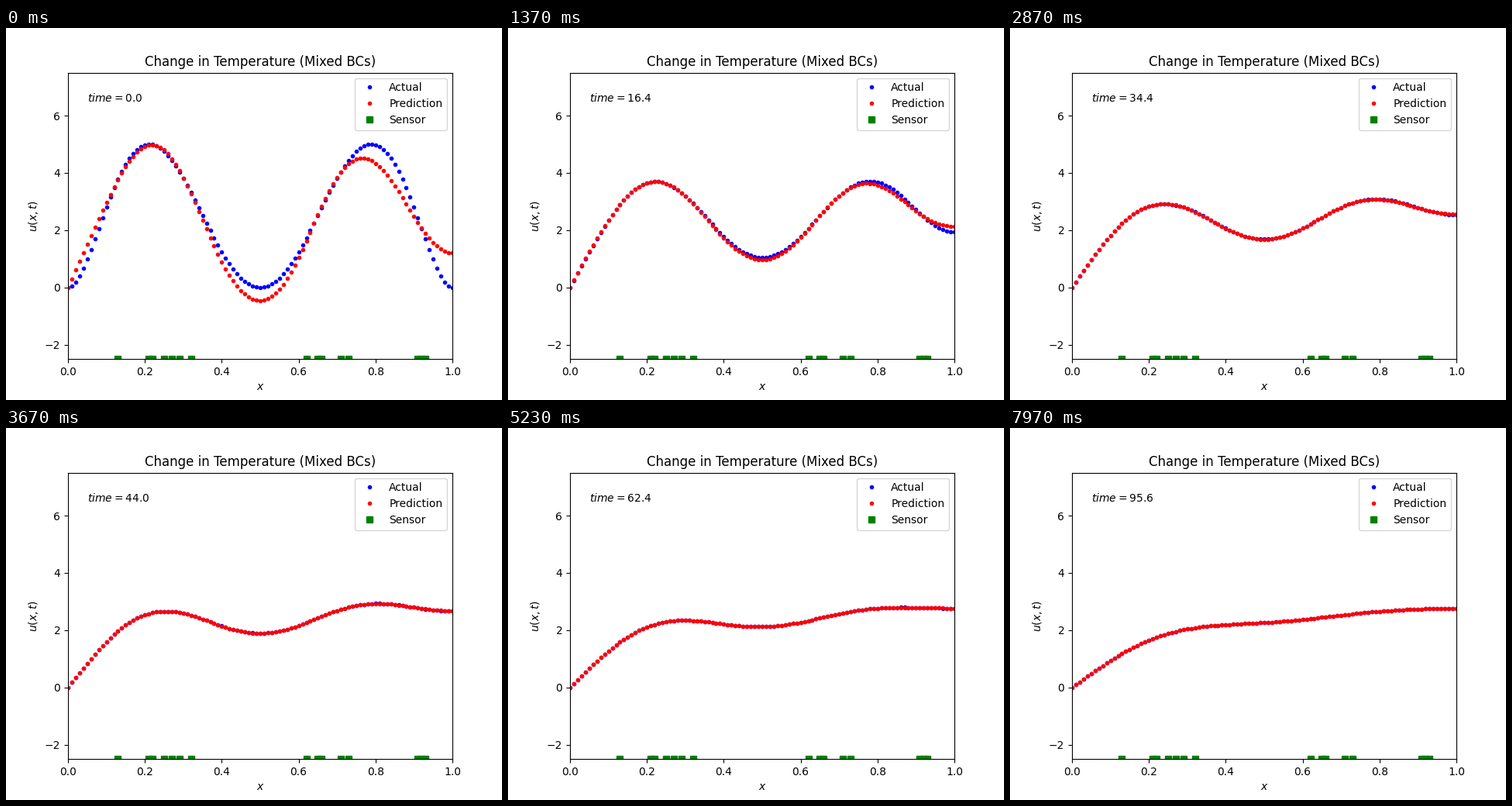
A matplotlib script for the animation above (8 s loop, 640 by 480 pixels).

```python
import numpy as np
import matplotlib.pyplot as plt
from matplotlib.animation import FuncAnimation

FRAMES, LOOP_MS = 240, 8000
DT = 0.4            # simulated time per frame
ALPHA = 3e-4        # diffusivity

x = np.linspace(0, 1, 101)
sensors = [.13, .21, .22, .25, .27, .29, .32, .62,
           .65, .66, .71, .73, .91, .92, .93]


def start(x):
    """Initial temperature: two humps of height 5."""
    return 2160 * (x * (1 - x) * (x - 0.5)) ** 2


def modes(x, count):
    """Eigenfunctions for u(0)=0, u'(1)=0, one per column."""
    k = (np.arange(count) + 0.5) * np.pi
    return np.sin(np.outer(x, k)), k


# Heat equation as a sine series
fine = np.linspace(0, 1, 4001)
coef = 2 * start(fine) @ modes(fine, 80)[0] / (len(fine) - 1)
basis, wave = modes(x, 80)


def actual(t):
    if t == 0:
        return start(x)
    return basis @ (coef * np.exp(-ALPHA * wave ** 2 * t))


# First prediction: a smooth curve through key points at x = 0.1 ... 1.0
keys = [2.97, 4.92, 3.82, .9, -.46, 1.05, 3.83, 4.33, 2.48, 1.21]
key_basis, _ = modes(np.arange(1, 11) / 10, 10)
guess = modes(x, 10)[0] @ np.linalg.solve(key_basis, keys)

# Its error fades, fastest near the fixed end
error = guess - start(x)
fade = 0.11 + 0.1 * np.exp(-8 * x)


def predicted(t):
    return actual(t) + error * np.exp(-fade * t)


fig, ax = plt.subplots(figsize=(6.4, 4.8), dpi=100)
true_dots, = ax.plot(x, actual(0), 'b.', label='Actual')
pred_dots, = ax.plot(x, predicted(0), 'r.', label='Prediction')
ax.plot(sensors, [-2.5] * len(sensors), 'gs', label='Sensor')
clock = ax.text(0.05, 6.5, '')
ax.set(xlim=(0, 1), ylim=(-2.5, 7.5), xlabel='$x$', ylabel='$u(x,t)$',
       title='Change in Temperature (Mixed BCs)')
ax.legend(loc='upper right')


def update(i):
    t = i * DT
    true_dots.set_ydata(actual(t))
    pred_dots.set_ydata(predicted(t))
    clock.set_text(f'$time = {t:.1f}$')
    return true_dots, pred_dots, clock


anim = FuncAnimation(fig, update, frames=FRAMES, interval=LOOP_MS / FRAMES,
                     init_func=lambda: update(0), repeat=True, repeat_delay=0)
plt.show()
```
